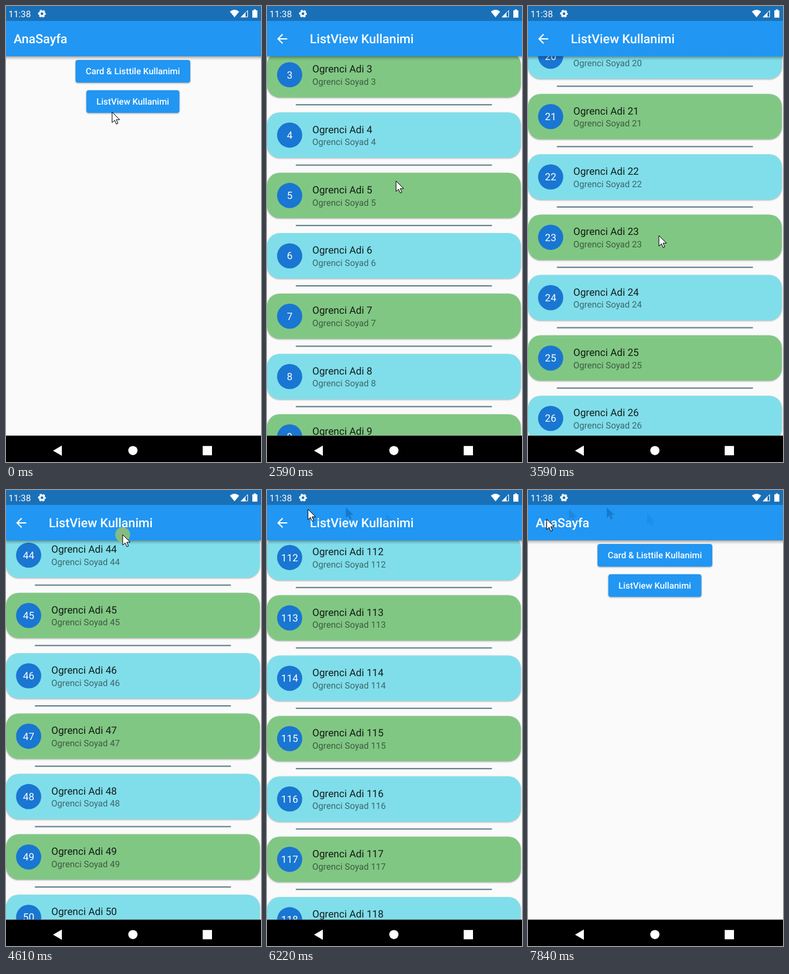
Animation, 411 px wide and 735 px high, one loop 8040 ms. Source, as an HTML page:

```html
<!DOCTYPE html>
<html lang="tr">
<head>
<meta charset="utf-8">
<title>ListView Kullanimi</title>
<style>
html, body { margin: 0; width: 100%; height: 100%; overflow: hidden; background: #fafafa; }
svg { display: block; width: 411px; height: 735px; font-family: Roboto, sans-serif; text-rendering: geometricPrecision; }
.bar { font-size: 20.32px; font-weight: 500; fill: #fff; }
.btn { font-size: 14.22px; font-weight: 500; fill: #fff; text-anchor: middle; }
.num { font-size: 16.26px; fill: #fff; text-anchor: middle; }
.name { font-size: 16.26px; fill: rgba(0,0,0,.87); }
.sub { font-size: 14.22px; fill: rgba(0,0,0,.54); }
.raised { filter: drop-shadow(0 1.5px 1.2px rgba(0,0,0,.35)); }
.card { filter: drop-shadow(0 1px .8px rgba(0,0,0,.3)); }
</style>
</head>
<body>
<svg viewBox="0 0 411 735">
  <defs>
    <linearGradient id="shade" x2="0" y2="1">
      <stop offset="0" stop-opacity=".34"/>
      <stop offset=".5" stop-opacity=".11"/>
      <stop offset="1" stop-opacity="0"/>
    </linearGradient>
    <clipPath id="view"><rect y="81" width="411" height="611.5"/></clipPath>
    <path id="arrow" d="M0 0V17L4 13.2L6.8 19.4L9.4 18.3L6.7 12.2H12.2Z"/>
  </defs>
  <rect width="411" height="735" fill="#fafafa"/>

  <g id="home">
    <rect class="raised" x="112" y="87" width="185" height="36.5" rx="4" fill="#2196f3"/>
    <text class="btn" x="204.4" y="110.3">Card &amp; Listtile Kullanimi</text>
    <rect class="raised" x="129.5" y="135.7" width="150" height="36.5" rx="4" fill="#2196f3"/>
    <text class="btn" x="204.4" y="159">ListView Kullanimi</text>
  </g>
  <g id="list" clip-path="url(#view)">
    <rect y="81" width="411" height="612" fill="#fafafa"/>
  </g>

  <rect y="81" width="411" height="7" fill="url(#shade)"/>
  <rect y="24" width="411" height="57" fill="#2196f3"/>
  <rect width="411" height="24" fill="#1a70b7"/>
  <text class="bar" id="homeBar" x="12.2" y="60.3">AnaSayfa</text>
  <g id="listBar">
    <path transform="translate(12.3 40.8) scale(1.016)" fill="#fff"
      d="M20 11H7.83l5.59-5.59L12 4l-8 8 8 8 1.41-1.41L7.83 13H20z"/>
    <text class="bar" x="69" y="60.3">ListView Kullanimi</text>
  </g>

  <g fill="#fff">
    <text x="4" y="18" font-size="14.5">11:38</text>
    <g fill="none" stroke="#fff" transform="translate(58 12.4)">
      <circle r="3.6" stroke-width="2.8"/>
      <circle r="5.3" stroke-width="2" stroke-dasharray="3.3 2.25" stroke-dashoffset="1.65"/>
    </g>
    <path d="M368.3 18.3L360.8 9Q368.3 3 375.8 9Z"/>
    <path d="M378 18.2L386 10.2V18.2Z"/>
    <path d="M379.2 17.7L389.5 7.4V17.7Z" fill="none" stroke="#fff"/>
    <path d="M397 7H399.4V5.4H402.7V7H405.2V18.8H397Z"/>
  </g>

  <rect y="692.5" width="411" height="42.5"/>
  <g fill="#fff">
    <path d="M75.8 716.7L90 708.4V725Z"/>
    <circle cx="204.5" cy="716.6" r="7.4"/>
    <rect x="317" y="709.2" width="15" height="15"/>
  </g>

  <g id="trail" fill="#0d4a8c"></g>
  <circle id="halo" r="12" fill="#f0e010" opacity=".5"/>
  <use id="cursor" href="#arrow" fill="#fff" stroke="#000" stroke-linejoin="round"/>
</svg>
<script>
const LOOP = 8040, STEP = 201, LEAD = 29;
const PITCH = 97.3, TOP = 121.5;
const $ = id => document.getElementById(id);

// key points: step, x, y
const path = [
  [0, 171, 171], [1, 184, 159], [4, 184, 159], [8, 199, 438], [9, 201, 487], [13, 208, 282],
  [16, 212, 530], [18, 211, 370], [23, 188, 72], [26, 192, 38], [28, 184, 190],
  [30, 127, 28], [31, 66, 31], [33, 24, 50], [36, 24, 50], [38, 31, 4], [39, 30, 47]
];
// key points: step, rows scrolled
const scroll = [[9, 0], [13, 2.11], [18, 19.417], [23, 43.17], [31, 111.13], [34, 117.6]];
const presses = [[4, 5], [9, 12], [21, 24], [36, 37]];
// fading pointer prints on the bar: step, opacity
const prints = [[26, .1], [30, .4], [31, .2]];

// value of key points at step n, straight between them
function at(keys, n) {
  const i = keys.findIndex(k => k[0] > n);
  if (i === 0) return keys[0].slice(1);
  if (i < 0) return keys[keys.length - 1].slice(1);
  const [n0, ...a] = keys[i - 1], [n1, ...b] = keys[i];
  return a.map((v, j) => v + (b[j] - v) * (n - n0) / (n1 - n0));
}

function make(tag, attrs, parent) {
  const el = document.createElementNS("http://www.w3.org/2000/svg", tag);
  for (const k in attrs) el.setAttribute(k, attrs[k]);
  return parent.appendChild(el);
}

const rows = Array.from({ length: 8 }, () => {
  const g = make("g", {}, $("list"));
  const card = make("rect", { class: "card", y: -36.6, width: 409.2, height: 73.2, rx: 20.3 }, g);
  make("circle", { cx: 36.5, r: 20.3, fill: "#1976d2" }, g);
  const num = make("text", { class: "num", x: 36.5, y: 5.7 }, g);
  const name = make("text", { class: "name", x: 73, y: -3.5 }, g);
  const sub = make("text", { class: "sub", x: 73, y: 16.2 }, g);
  make("rect", { x: 46.5, y: 47.4, width: 316, height: 2, fill: "#607d8b" }, g);
  return { g, card, num, name, sub };
});

const trail = prints.map(([n, opacity]) => {
  const [x, y] = at(path, n);
  return { n, el: make("use", { href: "#arrow", x, y, opacity }, $("trail")) };
});

function drawList(s) {
  const first = Math.floor(s);
  rows.forEach((r, j) => {
    const k = first + j;
    r.g.setAttribute("transform", `translate(0 ${TOP + (k - s) * PITCH})`);
    r.card.setAttribute("fill", k % 2 ? "#80deea" : "#81c784");
    r.num.textContent = k + 1;
    r.name.textContent = `Ogrenci Adi ${k + 1}`;
    r.sub.textContent = `Ogrenci Soyad ${k + 1}`;
  });
}

function draw(n) {
  drawList(at(scroll, n)[0]);
  const shown = Math.max(0, Math.min(1, (n - 4) / 2, (38 - n) / 2));
  $("list").style.opacity = $("listBar").style.opacity = shown;
  $("homeBar").style.opacity = 1 - shown;
  const down = presses.some(([a, b]) => n >= a && n < b);
  $("halo").style.display = down ? "" : "none";
  const [x, y] = at(path, n);
  for (const id of ["halo", "cursor"]) $(id).setAttribute("transform", `translate(${x} ${y})`);
  for (const p of trail) p.el.style.display = n > p.n ? "" : "none";
}

const start = performance.now();
let last;
function tick() {
  const t = (performance.now() - start) % LOOP;
  const n = Math.floor((t + LEAD) / STEP);
  if (n !== last) draw(last = n);
  requestAnimationFrame(tick);
}
tick();
</script>
</body>
</html>
```
